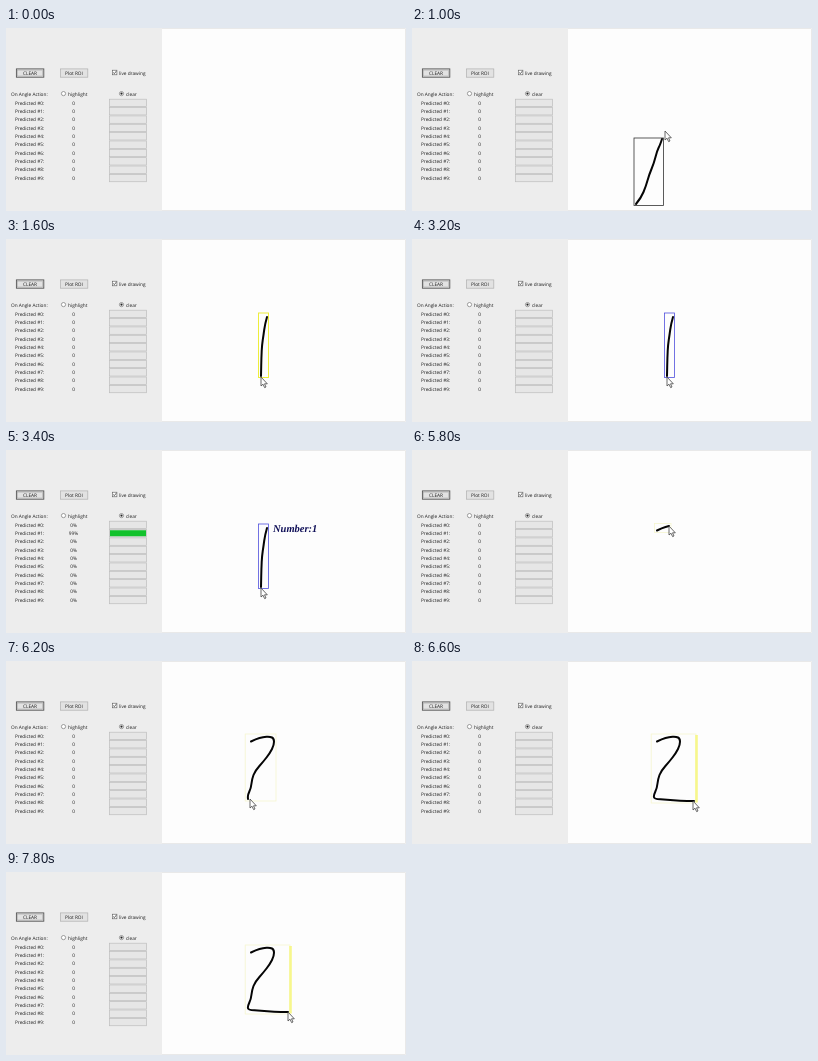
These frames come from a looping animation (400x183 px, 8000 ms). An HTML page:

```html
<!DOCTYPE html>
<html lang="en">
<head>
<meta charset="utf-8">
<title>Digit drawing</title>
<style>
  html, body { margin: 0; width: 100%; height: 100%; overflow: hidden; background: #ededed; }
  svg { display: block; width: 400px; height: 183px; }
  text { font-family: "Open Sans", "Noto Sans", sans-serif; font-size: 4.75px; fill: #1c1c1c; text-rendering: geometricPrecision; }
  .mid { text-anchor: middle; }
  .label { font: italic bold 10.5px "Liberation Serif", serif; fill: #101058; }
  .ink { fill: none; stroke: #050505; stroke-width: 2; stroke-linecap: round; stroke-linejoin: round; }
</style>
</head>
<body>
<svg id="stage" viewBox="0 0 400 183">
  <rect width="400" height="183" fill="#ededed"/>
  <rect x="156" width="244" height="183" fill="#fdfdfd"/>
  <path d="M156 .5H399.5V182.5H156" fill="none" stroke="#e9e9e9"/>
  <g id="panel"></g>
  <rect id="box" fill="none"/>
  <path id="edge" d="M284.5 74V141.5" stroke="#f7f78c" stroke-width="2.6"/>
  <path id="ink" class="ink"/>
  <text id="label" class="label" x="267" y="81.7">Number:1</text>
  <path id="cursor" d="M0 0V9L2 7.2L3.6 10.6L5 10L3.5 6.8H6.3Z" fill="#fff" stroke="#444" stroke-width=".8"/>
</svg>
<script>
const LOOP = 8000;
const $ = id => document.getElementById(id);
const panel = $("panel");

function add(tag, attrs, text) {
  const el = document.createElementNS("http://www.w3.org/2000/svg", tag);
  for (const k in attrs) el.setAttribute(k, attrs[k]);
  if (text !== undefined) el.textContent = text;
  return panel.appendChild(el);
}
const write = (x, y, text, cls = "") => add("text", { x, y, class: cls }, text);
const rect = (x, y, width, height, fill, stroke, w = 0.7) =>
  add("rect", { x, y, width, height, fill, stroke, "stroke-width": w });

// Controls
rect(10.4, 40.9, 27.4, 8.3, "#e2e2e2", "#555", 0.9);
rect(11.6, 42.1, 25, 5.9, "none", "#999", 0.4);
write(24, 46.8, "CLEAR", "mid");
rect(54.4, 40.9, 27.4, 8.3, "#e2e2e2", "#b0b0b0");
write(68, 46.8, "Plot ROI", "mid");
rect(106.3, 42.2, 4.6, 4.6, "#fff", "#555", 0.6);
add("path", { d: "M107.2 44.5L108.4 45.7L110.2 43.2", fill: "none", stroke: "#222", "stroke-width": 0.7 });
write(113, 46.7, "live drawing");
write(5, 67.7, "On Angle Action:");
for (const [x, name, on] of [[57.5, "highlight", 0], [115.5, "clear", 1]]) {
  add("circle", { cx: x, cy: 65.6, r: 2.1, fill: "#fff", stroke: "#666", "stroke-width": 0.6 });
  if (on) add("circle", { cx: x, cy: 65.6, r: 1.1, fill: "#222" });
  write(x + 4.6, 67.7, name);
}

// Prediction rows
const counts = [];
let bar;
for (let i = 0; i < 10; i++) {
  const y = 74.9 + i * 8.35;
  write(9, y + 1.7, `Predicted #${i}:`);
  counts.push(write(67.5, y + 1.7, "0", "mid"));
  rect(103.4, y - 3.7, 37.2, 7.4, "#e6e6e6", "#bdbdbd");
  if (i === 1) bar = rect(104, y - 3, 36, 6, "#12c22c", "none");
}

// Strokes: points and box padding (left, top, right, bottom)
const strokes = {
  slash: { pts: [[224,176],[229,170],[234,158],[237,147],[242,135],[245,123],[248,117],[250,111]], pad: [2,1,1.5,1.5] },
  one: { pts: [[261,78],[259,85],[257.5,96],[256,106],[255.4,118],[255,137]], pad: [2.5,4,1.5,1.5] },
  two: { pts: [[245,80.5],[250,78],[257,76],[264,75.5],[268,77.5],[268,84],[264,92],[257,101],[249,110],
               [246,118],[245,127],[241.7,134],[242,138],[255,138.6],[268,140],[282,140]], pad: [2.5,2.5,2,2] }
};

const YELLOW = ["#eeee3c", 1], PALE = ["#f6f6cf", 0.8], BLACK = ["#333", 0.8], BLUE = ["#5050dc", 0.8];

// time, cursor x, y, stroke, points drawn, box style, result shown
const steps = [
  [0],
  [900, 239, 143, "slash", 3.6, YELLOW],
  [1000, 253, 103, "slash", 7, BLACK],
  [1100, 259, 84],
  [1200, 261, 78],
  [1300, 259, 86, "one", 1.1, YELLOW],
  [1400, 257, 100, "one", 2.4, YELLOW],
  [1500, 255.5, 119, "one", 4, YELLOW],
  [1600, 255, 138, "one", 5, YELLOW],
  [3200, 255, 138, "one", 5, BLUE],
  [3300, 255, 138, "one", 5, BLUE, true],
  [5400, 255, 137],
  [5600, 250, 104],
  [5700, 245, 80],
  [5800, 257, 76, "two", 2, PALE],
  [5900, 268, 78, "two", 4, PALE],
  [6000, 264, 92, "two", 6, PALE],
  [6100, 248, 112, "two", 8.4, PALE],
  [6200, 244, 138, "two", 12, PALE],
  [6300, 259, 139, "two", 13.3, PALE],
  [6400, 276, 140, "two", 14.55, PALE],
  [6500, 279, 140, "two", 14.8, PALE],
  [6600, 281, 140, "two", 15, PALE],
  [6800, 282, 140, "two", 15, PALE]
];

function partial(pts, n) {
  const k = Math.floor(n), f = n - k, out = pts.slice(0, k + 1);
  if (f) out.push(pts[k].map((v, i) => v + (pts[k + 1][i] - v) * f));
  return out;
}

function curve(p) {
  let d = `M${p[0]}`;
  for (let i = 1; i < p.length - 1; i++) {
    const end = p[i].map((v, j) => (v + p[i + 1][j]) / 2);
    d += `Q${p[i]} ${end}`;
  }
  return d + `L${p[p.length - 1]}`;
}

const show = (el, on) => el.setAttribute("visibility", on ? "visible" : "hidden");

function pose([time, x, y, name, n, style, result]) {
  show($("cursor"), x !== undefined);
  if (x !== undefined) $("cursor").setAttribute("transform", `translate(${x} ${y})`);
  for (const id of ["box", "ink"]) show($(id), name);
  show($("edge"), time >= 6600);
  show($("label"), result);
  show(bar, result);
  counts.forEach((el, i) => el.textContent = result ? (i === 1 ? "99%" : "0%") : "0");
  if (!name) return;

  const { pts, pad } = strokes[name], p = partial(pts, n);
  $("ink").setAttribute("d", curve(p));
  const xs = p.map(q => q[0]), ys = p.map(q => q[1]);
  const left = Math.min(...xs) - pad[0], top = Math.min(...ys) - pad[1];
  const attrs = {
    x: left, y: top,
    width: Math.max(...xs) + pad[2] - left,
    height: Math.max(...ys) + pad[3] - top,
    stroke: style[0], "stroke-width": style[1]
  };
  for (const k in attrs) $("box").setAttribute(k, attrs[k]);
}

let last;
const start = performance.now();
function tick(now) {
  const t = Math.max(0, now - start) % LOOP;
  const step = steps.findLast(s => s[0] <= t);
  if (step !== last) pose(last = step);
  requestAnimationFrame(tick);
}
tick(start);
</script>
</body>
</html>
```
